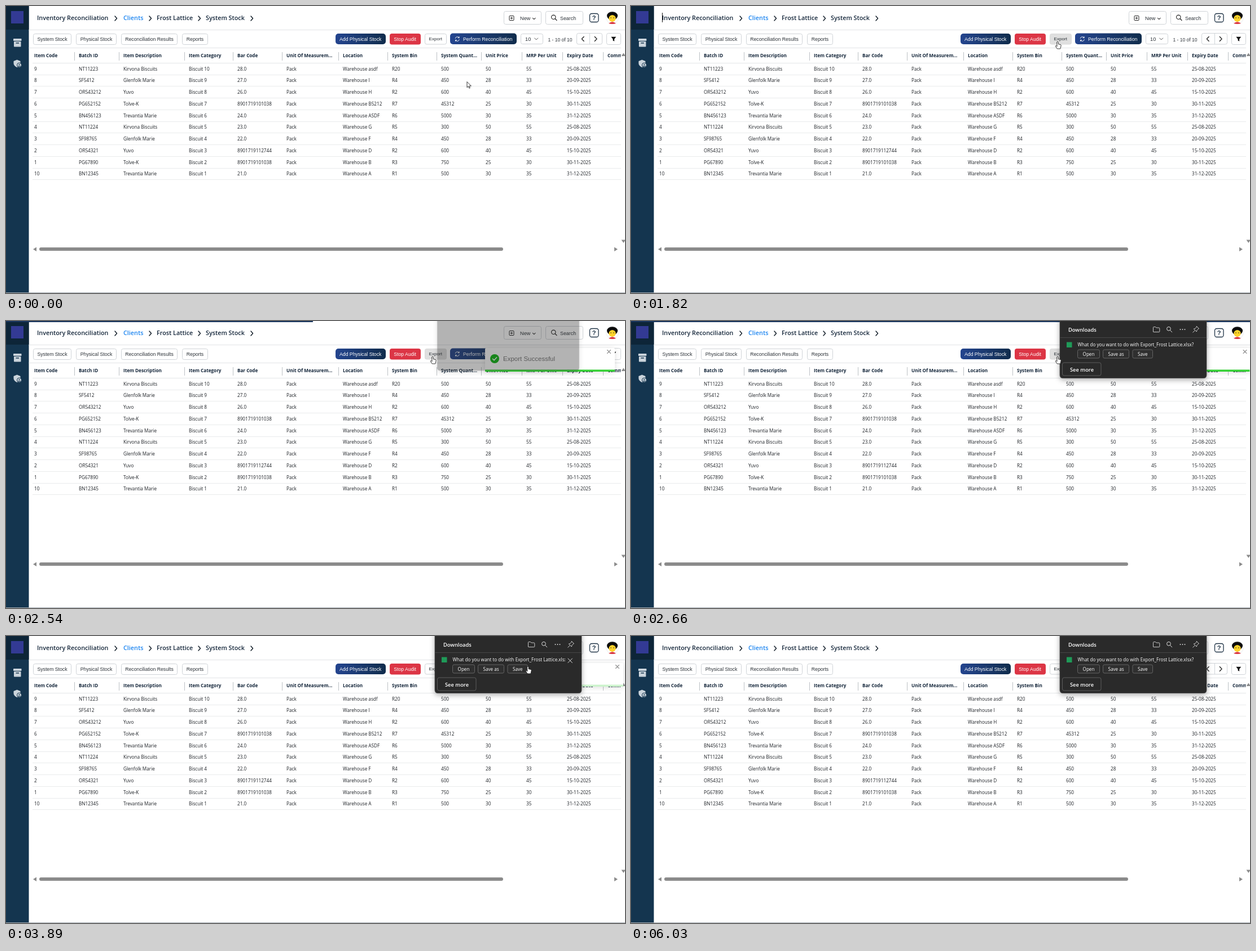
Recreate the animation shown at these times as an HTML page. Size 1097 by 510 pixels, loop 7440 ms.

```html
<!DOCTYPE html>
<html lang="en">
<head>
<meta charset="utf-8">
<title>Inventory Reconciliation</title>
<style>
html, body { margin: 0; width: 100%; height: 100%; overflow: hidden; background: #fff; }
svg { display: block; }
text { white-space: pre; }
.crumb, .head, .cell, .pop, .popBold { font-family: "Open Sans", "Noto Sans", sans-serif; }
.crumb { font-size: 10.8px; font-weight: 600; fill: #14263a; }
.head { font-size: 8.15px; font-weight: 700; fill: #14263a; }
.cell { font-size: 8.2px; fill: #1d2126; }
.pop { font-size: 8.15px; fill: #fff; }
.popBold { font-size: 9.3px; font-weight: 600; fill: #fff; }
.btn, .note { font-family: "Liberation Sans", Arial, sans-serif; }
.btn { font-size: 8.7px; fill: #2c3238; }
.note { font-size: 11.5px; fill: #757575; }
#toastCard { filter: drop-shadow(0 1px 5px rgba(0,0,0,.14)); }
#sheet { filter: drop-shadow(0 3px 5px rgba(0,0,0,.32)); }
</style>
</head>
<body>
<svg id="stage" width="1097" height="510" viewBox="0 0 1097 510">
  <defs>
    <linearGradient id="navy"><stop offset="0" stop-color="#24458f"/><stop offset="1" stop-color="#102c4c"/></linearGradient>
    <clipPath id="tableClip"><rect x="40" y="70" width="1050" height="260"/></clipPath>
    <clipPath id="askClip"><rect id="askBox" x="790" y="32" width="225" height="18"/></clipPath>
  </defs>
  <g id="page"></g>
  <rect id="bar" height="2" rx="1" fill="#17345c"/>
  <g id="toast"></g>
  <g id="popup">
    <g id="sheet"><path d="M760 -8H1020V96Q1020 101.500 1014.500 101.500H765.500Q760 101.500 760 96Z" fill="#2a2a2a" stroke="#4a4a4a" stroke-width=".7"/></g>
    <g id="popupBody"></g>
  </g>
  <g id="cursor" stroke-linejoin="round" stroke-linecap="round">
    <path id="arrow" d="M0 0V9.800L2.300 7.700L3.900 11.200L5.500 10.500L3.900 7.100H7Z" fill="#fff" stroke="#222" stroke-width=".9"/>
    <path id="hand" d="M-1.200 .8Q0 -.7 1.100 .8V4.600L5 5.500Q6.300 5.900 6.200 7.300L5.300 11.200L4.800 13H-.7L-3.600 8.800Q-4 7.500 -2.600 7.500L-1.200 8.600Z" fill="#fff" stroke="#222" stroke-width=".9"/>
  </g>
</svg>
<script>
const LOOP = 7440;
const $ = id => document.getElementById(id);

function add(parent, tag, attrs, content) {
  const el = document.createElementNS('http://www.w3.org/2000/svg', tag);
  for (const k in attrs) el.setAttribute(k, attrs[k]);
  if (content) el.textContent = content;
  parent.append(el);
  return el;
}
const text = (g, cls, x, y, str, extra) => add(g, 'text', { class: cls, x, y, ...extra }, str);
const rect = (g, x, y, width, height, fill, extra) => add(g, 'rect', { x, y, width, height, fill, ...extra });
const line = (g, d, stroke, width = 1, extra) =>
  add(g, 'path', { d, stroke, 'stroke-width': width, fill: 'none', 'stroke-linecap': 'round', 'stroke-linejoin': 'round', ...extra });
const shape = (g, d, fill) => add(g, 'path', { d, fill });
const dot = (g, cx, cy, r, fill, extra) => add(g, 'circle', { cx, cy, r, fill, ...extra });
const frame = (g, x, y, w, h, rx = 3, stroke = '#cfd3d7', fill = '#fff') =>
  rect(g, x + .5, y + .5, w - 1, h - 1, fill, { rx, stroke });

const page = $('page');

// Sidebar
rect(page, 0, 0, 40.500, 510, '#14354f');
rect(page, 0, 0, 40.500, 42, '#0d2538');
rect(page, 9, 9, 22, 22, '#333a94');
rect(page, 13, 58, 14.500, 4, '#cbd4dc', { rx: .8 });
rect(page, 14, 63, 12.500, 9.500, '#cbd4dc', { rx: .8 });
rect(page, 17.500, 65, 5.500, 1.500, '#14354f');
shape(page, 'M19.500 95.500L25.500 98V102C25.500 105.500 22.500 108 19.500 109C16 107.500 13.500 105 13.500 102V98Z', '#cbd4dc');
dot(page, 23.500, 105, 4, '#cbd4dc', { stroke: '#14354f' });
dot(page, 23.500, 104, 1.100, '#14354f');
line(page, 'M21.800 106.800H25.200', '#14354f', 1.200);

// Header
rect(page, 40.500, 42, 1056.500, 1, '#e2e4e6');
text(page, 'crumb', 55, 25, 'Inventory Reconciliation');
text(page, 'crumb', 208, 25, 'Clients', { style: 'fill:#1b84f0' });
text(page, 'crumb', 267, 25, 'Frost Lattice');
text(page, 'crumb', 354, 25, 'System Stock');
for (const x of [193, 254, 341, 434]) line(page, `M${x} 18l3.500 4-3.500 4`, '#17222d', 1.500);
const caret = rect(page, 55, 12, 1, 17, '#111');

frame(page, 882, 9, 67, 24);
rect(page, 892, 17.500, 8, 8, 'none', { rx: 1, stroke: '#222' });
line(page, 'M894.200 21.500H897.800M896 19.700V23.300', '#222', 1);
text(page, 'btn', 911, 24.800, 'New', { style: 'font-size:9.2px' });
line(page, 'M933.500 21.300l2.300 2.300 2.300-2.300', '#333', 1.100);
frame(page, 956, 9, 67, 24);
dot(page, 970.300, 19.800, 3.700, 'none', { stroke: '#222', 'stroke-width': 1.100 });
line(page, 'M973 22.500l3 3', '#222', 1.200);
text(page, 'btn', 982, 24.800, 'Search', { style: 'font-size:8.9px' });
rect(page, 1034.500, 13.500, 15.500, 15, '#fff', { rx: 3.500, stroke: '#1d3144', 'stroke-width': 1.300 });
text(page, 'btn', 1042.200, 24.800, '?', { 'text-anchor': 'middle', style: 'font-size:11px;font-weight:700;fill:#1d3144' });

// Avatar
dot(page, 1074.500, 20.500, 11, '#fff', { stroke: '#eceff1' });
add(page, 'ellipse', { cx: 1074.500, cy: 17.500, rx: 9.500, ry: 7.300, fill: '#0b0b0b' });
add(page, 'ellipse', { cx: 1074.500, cy: 22, rx: 6.200, ry: 6, fill: '#ffd32a' });
shape(page, 'M1068 31Q1074.500 25.500 1081 31Q1074.500 33 1068 31Z', '#d8343f');
dot(page, 1072, 21, .8, '#222');
dot(page, 1077, 21, .8, '#222');

// Toolbar
for (const [x, w, label] of [[48, 68, 'System Stock'], [124, 72, 'Physical Stock'], [204, 100, 'Reconciliation Results'], [312, 46, 'Reports']]) {
  frame(page, x, 49, w, 20);
  text(page, 'btn', x + w / 2, 61.800, label, { 'text-anchor': 'middle' });
}
const white = { style: 'fill:#fff' };
rect(page, 584, 49, 89, 19, 'url(#navy)', { rx: 5 });
text(page, 'btn', 591, 61.800, 'Add Physical Stock', white);
rect(page, 680, 49, 55, 19.500, '#dc3545', { rx: 4 });
text(page, 'btn', 687.300, 61.800, 'Stop Audit', white);
const exportBtn = frame(page, 742, 49, 39, 19.500);
text(page, 'btn', 761.300, 61.300, 'Export', { 'text-anchor': 'middle', style: 'font-size:8.1px' });
rect(page, 787, 48.500, 118, 19.500, 'url(#navy)', { rx: 5 });
line(page, 'M796.300 57.500A3.600 3.600 0 0 1 803 56.600V54.500M803 56.600H801M803.300 59.700A3.600 3.600 0 0 1 796.600 60.600V62.600M796.600 60.600H798.600', '#fff', .9);
text(page, 'btn', 810, 61.500, 'Perform Reconciliation', white);
frame(page, 912, 49, 40, 19);
text(page, 'btn', 920, 61.800, '10', { style: 'font-size:9.3px' });
line(page, 'M936.700 57l3 3 3-3', '#555', 1);
text(page, 'btn', 960.500, 62.800, '1 - 10 of 10', { style: 'font-size:8.5px' });
frame(page, 1011, 48, 46, 20.500);
rect(page, 1034, 48.500, 1, 19.500, '#cfd3d7');
line(page, 'M1024.200 54.500l-3.800 4 3.800 4M1043.300 54.500l3.800 4-3.800 4', '#222', 1.300);
frame(page, 1064, 48, 26, 21);
shape(page, 'M1072.300 54.800H1081.300L1078.100 58.700V62.800L1075.500 61.300V58.700Z', '#111');

// Table
const table = add(page, 'g', { 'clip-path': 'url(#tableClip)' });
const cols = [50, 129, 208, 324, 410, 497, 597, 684, 771, 850, 922, 994, 1066];
const titles = 'Item Code|Batch ID|Item Description|Item Category|Bar Code|Unit Of Measurem...|Location|System Bin|System Quant...|Unit Price|MRP Per Unit|Expiry Date|Comm'.split('|');
// code, batch, barcode, location, bin, quantity
const rows = `9|NT11223|28.0|asdf|R20|500
8|SF5412|27.0|I|R4|450
7|OR543212|26.0|H|R2|600
6|PG652152|8901719101038|B5212|R7|45312
5|BN456123|24.0|ASDF|R6|5000
4|NT11224|23.0|G|R5|300
3|SF98765|22.0|F|R4|450
2|OR54321|8901719112744|D|R2|600
1|PG67890|8901719101038|B|R3|750
10|BN12345|21.0|A|R1|500`.split('\n').map(r => r.split('|'));
// name, price, retail price, expiry
const goods = [
  ['Kirvona Biscuits', 50, 55, '25-08-2025'],
  ['Glenfolk Marie', 28, 33, '20-09-2025'],
  ['Yuvo', 40, 45, '15-10-2025'],
  ['Tolve-K', 25, 30, '30-11-2025'],
  ['Trevantia Marie', 30, 35, '31-12-2025']
];
rect(table, 40.500, 74, 1050, 1, '#e2e4e6');
cols.forEach((x, i) => {
  text(table, 'head', x, 91, titles[i]);
  if (i) rect(table, x - 8, 82, 1, 15, '#bcc1c5');
});
rect(table, 47, 101, 1043, 1, '#e4e6e8');
rows.forEach(([code, batch, bars, place, bin, qty], i) => {
  const [name, price, mrp, expiry] = goods[i % 5];
  const cells = [code, batch, name, 'Biscuit ' + (10 - i), bars, 'Pack', 'Warehouse ' + place, bin, qty, price, mrp, expiry];
  const y = 111.600 + i * 20.750;
  cells.forEach((c, k) => text(table, 'cell', cols[k], y + 3, c));
  rect(table, 47, Math.round(y + 10), 1043, 1, '#e9ebec');
});

// Scrollbars
rect(page, 59, 429, 822, 6, '#8b8b8b', { rx: 3 });
shape(page, 'M48 432.300L54 428.500V436.100Z', '#8b8b8b');
shape(page, 'M1084 432.300L1078 428.500V436.100Z', '#8b8b8b');
shape(page, 'M1090.500 89L1094.300 83.500L1098 89Z', '#8b8b8b');
shape(page, 'M1090.500 415.500H1098L1094.300 421Z', '#8b8b8b');
rect(page, 0, 509, 1097, 1, '#a3abb1');

// Toast
const toast = $('toast');
rect(add(toast, 'g', { id: 'toastCard' }), 864, 48, 230, 42, '#fff', { rx: 2 });
dot(toast, 881, 67, 8, '#0fb814');
line(toast, 'M877.500 67.300l2.500 2.500 4.600-5', '#fff', 1.600);
text(toast, 'note', 896, 71, 'Export Successful');
line(toast, 'M1080.500 51.500l6 6M1086.500 51.500l-6 6', '#8d8d8d', 1.100);
rect(toast, 864, 86.500, 230, 3.500, '#35d035', { opacity: .25 });
const timer = rect(toast, 864, 86.500, 230, 3.500, '#35d035');

// Downloads popup
const pop = $('popupBody');
const pale = '#dcdcdc';
text(pop, 'popBold', 775, 18.500, 'Downloads');
line(pop, 'M925.500 18.800V11.500Q925.500 10.500 926.500 10.500H929.500L931 12H935.500Q936.800 12 936.800 13.200V18.500Q936.800 19.600 935.700 19.600H926.500Q925.500 19.600 925.500 18.800Z', pale, .9);
dot(pop, 953, 13.800, 3.400, 'none', { stroke: pale });
line(pop, 'M955.500 16.500l3.300 3.300', pale, 1);
for (const x of [973.500, 977.500, 981.500]) dot(pop, x, 15, .9, pale);
line(pop, 'M1002.500 9.500l4 4-1.500 .8-2 2.200-.7 2.500-5-5 2.500-.7 2.200-2zM999.500 16.700l-3.700 3.500', pale, .9);
rect(pop, 760.500, 29, 259, 1, '#474747');
rect(pop, 772, 37.500, 9.500, 9.500, '#1f9a58');
const ask = add(pop, 'g', { 'clip-path': 'url(#askClip)' });
text(ask, 'pop', 791.500, 45.300, 'What do you want to do with Export_Frost Lattice.xlsx?');
for (const [x, w, label] of [[791, 40, 'Open'], [836, 47, 'Save as'], [888.500, 36.500, 'Save']]) {
  frame(pop, x, 50.500, w, 16, 2.500, '#646464', '#2f2f2f');
  text(pop, 'pop', x + w / 2, 61.600, label, { 'text-anchor': 'middle' });
}
frame(pop, 764, 73.500, 69.500, 24, 3, '#5c5c5c', '#2a2a2a');
text(pop, 'popBold', 799, 89.800, 'See more', { 'text-anchor': 'middle' });
const dismiss = line(pop, 'M996 40l7.500 7.500M1003.500 40l-7.500 7.500', pale, 1);

// Motion tables: [time, ...values]
const mouse = [[40, 817, 135], [460, 756, 63], [3080, 756, 63], [3800, 908, 51], [3890, 925, 54], [4150, 946, 54],
  [4450, 946, 54], [4650, 1003, 36], [4820, 1003, 36], [4860, 1004, 35], [5210, 1004, 35], [5450, 1003, 352], [5630, 1003, 352], [6030, 1100, 515]];
const slide = [[2130, 1800], [2550, -15], [2655, 6], [2760, -3], [2830, 0], [5630, 0], [5770, -15], [6330, 1440]];
const loading = [[2320, 60], [2540, 544], [2640, 1110]];
const loadFade = [[3040, 1], [3280, 0]];
const countdown = [[2630, 230], [5630, 0]];
const sheetFade = [[2500, 0], [2540, .34], [2600, 1]];
const bodyFade = [[2545, 0], [2600, 1]];
const grow = [[2540, 0], [2610, 1]];

const smooth = k => k * k * (3 - 2 * k);
const easeOut = k => 1 - (1 - k) ** 3;
const linear = k => k;

function at(track, t, ease = linear) {
  if (t <= track[0][0]) return track[0].slice(1);
  for (let i = 1; i < track.length; i++) {
    const [a, b] = [track[i - 1], track[i]];
    if (t < b[0]) {
      const k = ease((t - a[0]) / (b[0] - a[0]));
      return a.slice(1).map((v, n) => v + (b[n + 1] - v) * k);
    }
  }
  return track[track.length - 1].slice(1);
}
const show = (el, on) => el.setAttribute('visibility', on ? 'visible' : 'hidden');
const within = (t, a, b) => t >= a && t < b;

function draw(t) {
  show(caret, within(t, 1820, 2320));
  const hover = within(t, 380, 3140);
  exportBtn.setAttribute('fill', hover ? '#dfdfdf' : '#fff');
  exportBtn.setAttribute('stroke', hover ? '#dadada' : '#cfd3d7');

  show($('bar'), within(t, 2320, 3280));
  $('bar').setAttribute('opacity', at(loadFade, t)[0]);
  $('bar').setAttribute('width', at(loading, t, smooth)[0]);

  show(toast, within(t, 2130, 6330));
  const inOut = t < 5770 ? easeOut : smooth;
  toast.setAttribute('transform', `translate(${at(slide, t, inOut)[0]} 0)`);
  timer.setAttribute('width', at(countdown, t)[0]);

  const [g] = at(grow, t, easeOut);
  show($('popup'), t >= 2500);
  $('popup').setAttribute('transform', `translate(890 ${-14 * (1 - g)}) scale(${.965 + .035 * g} 1) translate(-890 0)`);
  $('sheet').setAttribute('opacity', at(sheetFade, t)[0]);
  pop.setAttribute('opacity', at(bodyFade, t)[0]);
  const rowHover = within(t, 3240, 5250);
  $('askBox').setAttribute('width', rowHover ? 201 : 225);
  dismiss.setAttribute('opacity', rowHover ? 1 : 0);

  const [x, y] = at(mouse, t, smooth);
  const pointing = within(t, 380, 5250);
  $('cursor').setAttribute('transform', `translate(${x} ${y})`);
  show($('cursor'), t < 6030);
  $('hand').setAttribute('opacity', pointing ? 1 : 0);
  $('arrow').setAttribute('opacity', pointing ? 0 : 1);
}

const start = performance.now();
function tick() {
  draw((performance.now() - start) % LOOP);
  requestAnimationFrame(tick);
}
tick();
</script>
</body>
</html>
```
